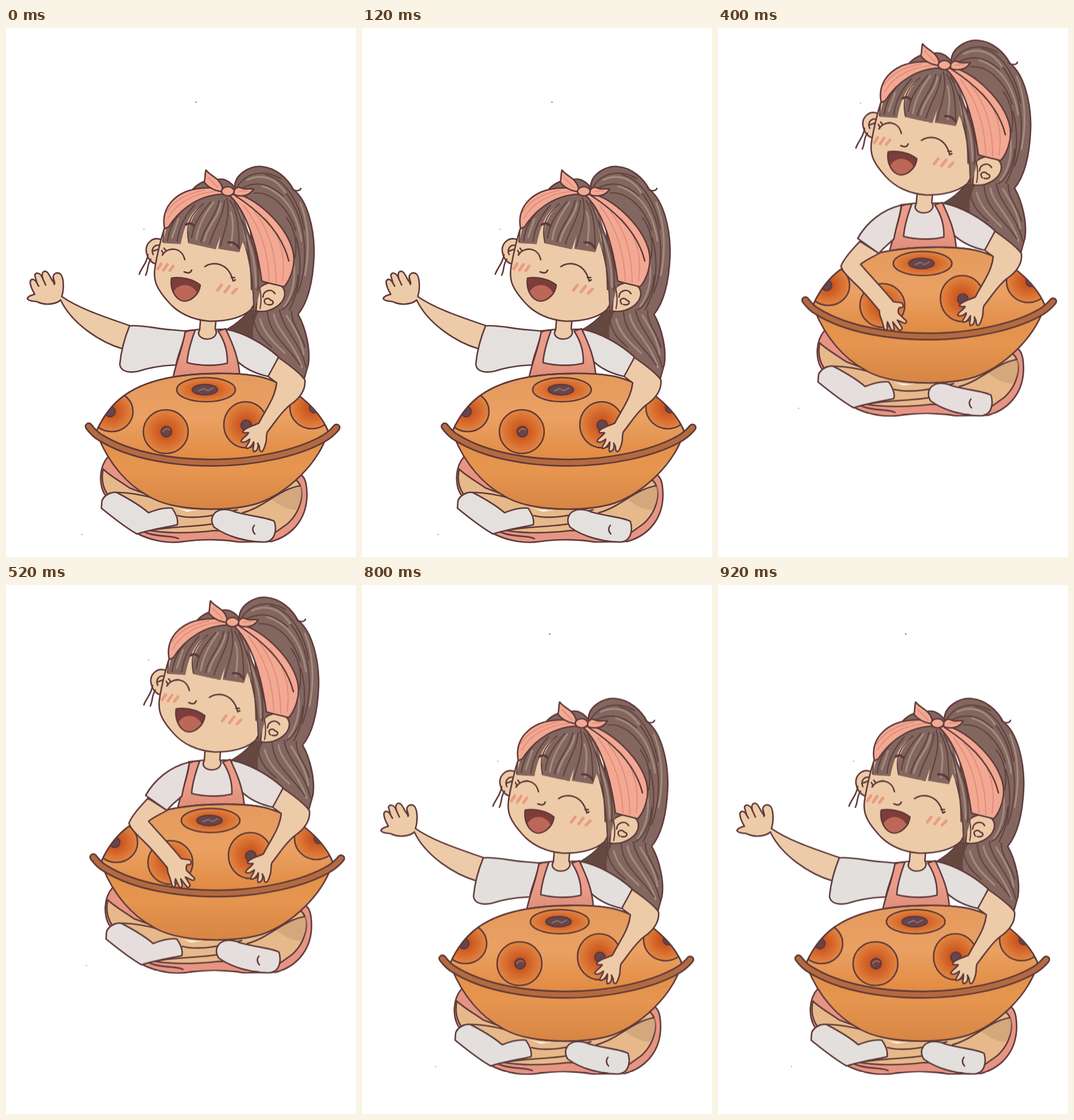
These frames come from a looping animation (609x920 px, 1 s). An HTML page without scripts:

```html
<!DOCTYPE html>
<html lang="en">
<head>
<meta charset="utf-8">
<title>Handpan girl</title>
<style>
  html, body { margin: 0; width: 100%; height: 100%; overflow: hidden; background: #fff; }
  svg { display: block; width: 100vw; height: 100vh; }

  #girl, .cloth, .arm { animation: 1s step-end infinite; }
  #girl { animation-name: hop; }
  .cloth { animation-name: shade; }
  #up { animation-name: up; }
  #down { animation-name: down; }
  #side { animation-name: side; }

  @keyframes hop {
    0% { transform: translate(0, 0); }
    20% { transform: translate(8px, -138.5px); }
    40% { transform: translate(8px, -219.5px); }
    60% { transform: translate(2.5px, -161.5px); }
    80% { transform: translate(-4px, -43.5px); }
  }
  @keyframes shade {
    0% { fill: #e4e0de; }
    20% { fill: #dcd7d8; }
    40% { fill: #e6dedd; }
    60% { fill: #efecea; }
    80% { fill: #e2dfdd; }
  }
  @keyframes up { 0%, 80% { visibility: visible; } 20% { visibility: hidden; } }
  @keyframes down { 0%, 60% { visibility: hidden; } 20% { visibility: visible; } }
  @keyframes side { 0%, 80% { visibility: hidden; } 60% { visibility: visible; } }

  path, ellipse { stroke: #5f3a3b; stroke-width: 2.6; stroke-linecap: round; stroke-linejoin: round; }
  .line { fill: none; }
  .bare { stroke: none; }
  .skin { fill: #edcba8; }
  .tan { fill: #e7b98a; }
  .pink { fill: #e69583; }
  .band { fill: #f2a892; }
  .hair { fill: #83665f; }
  .lit { fill: none; stroke: #a28c7e; stroke-width: 3.2; }
  .strand { fill: none; stroke: #60423f; stroke-width: 2.2; }
  .fold { fill: none; stroke: #de8874; stroke-width: 1.6; }
  .blush { fill: none; stroke: #eb9a82; stroke-width: 5; }
  .note { fill: url(#note); }
  .core { fill: #66464b; }
</style>
</head>
<body>
<svg viewBox="0 0 609 920" preserveAspectRatio="none">
  <defs>
    <linearGradient id="dome" x2="0" y2="1">
      <stop offset="0" stop-color="#e59a5d"/>
      <stop offset=".5" stop-color="#eaa163"/>
      <stop offset="1" stop-color="#e1893f"/>
    </linearGradient>
    <linearGradient id="bowl" x2="0" y2="1">
      <stop offset="0" stop-color="#e29047"/>
      <stop offset=".45" stop-color="#e69650"/>
      <stop offset="1" stop-color="#d78544"/>
    </linearGradient>
    <radialGradient id="note">
      <stop offset=".2" stop-color="#c9541f"/>
      <stop offset=".65" stop-color="#d96f30"/>
      <stop offset="1" stop-color="#e18743"/>
    </radialGradient>
    <linearGradient id="bib" x2="0" y2="1">
      <stop offset=".5" stop-color="#ea9c88"/>
      <stop offset="1" stop-color="#dd8c78"/>
    </linearGradient>
    <clipPath id="top">
      <path d="M158 700C180 652 215 620 290 607C330 600 400 598 440 606C500 620 545 665 560 700L557 712Q360 800 162 711Z"/>
    </clipPath>
  </defs>

  <g id="girl">
    <!-- stray specks -->
    <path class="line" stroke-width="1" d="M330 129l1 0M240 350h.1M132 881h.1" style="stroke-width:1.5"/>

    <!-- ponytail -->
    <path class="hair" d="M398 278C397 255 424 239 445 241C470 243 490 262 500 281C525 300 537 350 536 395C534 446 523 480 508 498C522 522 530 560 526 585L519 610C500 590 470 575 450 560L385 524C412 508 430 490 436 460L420 300Z"/>
    <path class="line" d="M497 278C502 285 511 284 513 279"/>
    <path class="bare" fill="#65483f" d="M385 524Q415 508 424 490L440 492Q425 520 432 545Z"/>
    <path class="lit" d="M420 264C447 252 470 262 486 286M446 275C482 286 506 318 514 370M512 304C525 335 530 380 520 430M500 405C506 440 496 468 484 484M466 498C470 525 500 545 515 590M488 500C500 520 514 540 518 568M442 506C450 535 470 550 485 565"/>
    <path class="strand" d="M403 275C420 250 452 246 478 262M410 279C436 264 460 272 482 292M432 287C460 284 490 310 504 352M452 255C490 264 512 310 519 350M488 288C520 330 530 400 508 460M505 365C518 410 510 460 493 490M508 430C506 465 490 485 480 490M455 494C458 535 490 552 512 586M476 490C482 525 512 545 522 590M497 492C496 515 514 530 520 555M430 500C432 530 450 545 462 555M488 330C500 345 508 370 503 400"/>

    <!-- legs -->
    <path class="pink" d="M178 745C160 765 163 795 171 810L228 879C255 893 285 897 310 893C345 888 385 890 405 894L462 893C500 882 528 850 523 800C522 788 519 780 512 776L440 790Z"/>
    <path class="tan" d="M169 767C180 778 195 786 215 800L275 822C300 840 390 842 440 826L505 786C523 802 514 840 490 862L469 877L362 874C330 878 290 880 250 874L298 862L220 840L176 810C168 798 166 782 169 767Z"/>
    <path class="bare" fill="#c99d73" opacity=".6" d="M462 820Q490 800 514 794Q518 820 505 838Q485 838 462 820Z"/>
    <path class="line" d="M180 809C200 805 250 812 277 826M250 874C290 866 330 868 362 862M299 848C330 856 370 846 402 838M412 843C450 833 475 802 512 796M240 876C260 886 290 882 300 888"/>
    <path class="bare" fill="#fff" d="M286 832Q310 841 338 838L315 841Z"/>
    <path class="cloth" d="M167 822C171 812 184 806 193 808C214 819 232 829 248 843C265 836 280 834 289 835C296 845 300 856 298 864C280 868 252 872 228 880C205 867 182 848 166 835Z"/>
    <path class="cloth" d="M362 845C370 835 386 836 400 842C430 850 455 851 467 858C472 875 467 893 450 894C420 894 385 885 362 868C357 860 357 852 362 845Z"/>
    <path class="line" d="M432 865Q426 872 433 880"/>

    <!-- torso -->
    <path class="cloth" d="M310 527L337 524Q352 530 368 524L385 524L403 580L400 605H296Z"/>
    <path class="skin" d="M339 500L337 525C331 534 340 541 350 541C361 541 370 533 364 523L366 500Z"/>
    <path class="cloth" d="M383 524C415 530 450 550 474 572C470 582 465 594 456 606C438 602 418 594 403 580Z"/>
    <path fill="url(#bib)" d="M311 529Q320 525 329 526C322 545 316 566 315 582C338 588 366 588 385 583C386 562 379 542 369 527L382 523C394 548 406 575 407 610L290 612C294 585 308 557 311 529Z"/>

    <!-- drum -->
    <path fill="url(#bowl)" d="M160 710C180 760 213 795 246 813C290 842 392 842 440 826C490 808 540 760 558 710Q360 800 160 710Z"/>
    <path fill="url(#dome)" d="M158 700C180 652 215 620 290 607C330 600 400 598 440 606C500 620 545 665 560 700L557 712Q360 800 162 711Z"/>
    <g clip-path="url(#top)">
      <ellipse class="note" cx="184" cy="667" rx="37" ry="35"/>
      <ellipse class="core" cx="181" cy="667" rx="9" ry="9"/>
      <ellipse class="note" cx="532" cy="660" rx="38" ry="37"/>
      <ellipse class="core" cx="536" cy="660" rx="8" ry="9"/>
    </g>
    <path class="line" d="M158 700C180 652 215 620 290 607C330 600 400 598 440 606C500 620 545 665 560 700"/>
    <ellipse class="note" cx="348" cy="629" rx="51" ry="21"/>
    <ellipse class="core" cx="346" cy="629" rx="22" ry="9"/>
    <path class="line" style="stroke:#90757a;stroke-width:2" d="M335 631L344 627L351 631L360 626"/>
    <ellipse class="note" cx="278" cy="702" rx="39" ry="38"/>
    <ellipse class="core" cx="279" cy="702" rx="9" ry="9"/>
    <path class="line" style="stroke:#b9683f;stroke-width:2" d="M273 702Q278 694 285 699"/>
    <ellipse class="note" cx="417" cy="690" rx="38" ry="40"/>
    <ellipse class="core" cx="418" cy="691" rx="9" ry="9"/>
    <g class="line">
      <path id="rim" style="stroke-width:14" d="M144 693C150 701 155 707 164 712C220 747 300 756 360 756C430 756 510 740 556 712C564 707 570 701 575 695"/>
      <path style="stroke:#b46a40;stroke-width:8.5" d="M144 693C150 701 155 707 164 712C220 747 300 756 360 756C430 756 510 740 556 712C564 707 570 701 575 695"/>
    </g>

    <!-- right arm -->
    <path class="skin" d="M474 573C490 584 511 599 520 612C522 630 510 645 495 655C478 668 466 689 455 702C452 708 454 716 452 722C450 728 449 733 446 736C442 738 441 734 441 728L438 722C440 730 437 736 431 737C428 734 432 727 431 720C428 727 423 732 418 731C416 727 424 722 424 715C419 719 413 722 409 719C409 714 418 711 422 704C418 703 413 706 412 702C416 694 431 692 440 687C450 666 468 645 471 617L456 606Z"/>

    <!-- left arm poses -->
    <g id="up" class="arm">
      <path class="skin" d="M216 518C180 505 130 490 97 467C101 455 101 435 95 428C88 423 82 428 82 434L85 444C78 440 76 425 69 423C62 423 62 430 64 436C60 425 52 424 50 430L54 444C50 436 44 435 42 441C42 450 47 458 50 463C44 465 38 466 37 471C42 477 52 474 56 477C70 483 88 480 95 473C115 515 165 547 203 558Z"/>
      <path class="line" d="M64 436L69 447M82 434L84 446M54 444L57 449"/>
      <path class="cloth" d="M215 518C240 516 265 524 290 525L312 527C309 550 298 570 296 586C270 587 245 592 230 597C212 601 199 596 198 585C200 563 206 540 215 518Z"/>
    </g>
    <g id="down" class="arm">
      <g transform="translate(-8 138.5)">
        <path class="skin" d="M247 452C235 465 220 480 214 495C216 505 230 517 245 532C258 545 270 560 281 573C280 580 284 586 286 593L289 604C292 609 296 605 294 598L295 592L301 605C304 610 308 606 306 600L304 592L314 605C318 609 322 605 319 600L312 589L323 594C328 596 330 591 325 588L314 577C313 572 314 567 317 567C322 569 324 564 320 559L305 557C288 535 265 512 248 492C256 485 268 480 280 473Z"/>
        <path class="cloth" d="M319 389C285 397 258 420 243 447L280 473C288 463 298 456 306 448C310 425 317 408 319 389Z"/>
      </g>
    </g>
    <g id="side" class="arm">
      <g transform="translate(-2.5 161.5)">
        <path class="skin" d="M214 378C180 383 142 396 107 424C102 428 98 424 90 420C80 412 65 407 53 413C50 420 60 422 70 426C60 431 45 428 36 432C34 439 42 440 55 441C45 442 36 443 36 449C42 453 50 451 57 450C50 453 43 456 45 461C52 463 62 461 73 458C72 464 66 470 68 475C75 478 87 468 93 459C100 448 108 446 120 443C150 431 180 422 211 407Z"/>
        <path class="line" d="M55 441L70 442M57 450L70 449M70 426C80 432 90 428 96 427"/>
        <path class="cloth" d="M215 377C230 366 250 362 270 362L315 365C312 390 303 408 302 425C270 432 240 435 215 435C208 420 209 395 215 377Z"/>
      </g>
    </g>

    <!-- head -->
    <path class="hair" d="M322 284C335 268 350 264 362 265C377 259 390 266 400 280L425 300L360 310Z"/>
    <path class="skin" d="M272 369C256 361 243 374 244 388C246 402 254 411 266 411Z"/>
    <path class="line" d="M267 378C257 376 252 386 256 394M256 388L267 384M247 394C245 410 236 416 232 428M252 402C245 412 248 420 243 430"/>
    <path class="skin" d="M275 350C268 372 264 390 260 412C254 440 264 456 284 478C300 496 325 508 355 510C385 510 410 504 426 490C440 470 445 430 436 395L400 300L340 295Z"/>
    <path class="skin" d="M438 456C450 437 483 440 485 460C486 480 460 497 435 492Z"/>
    <path class="line" d="M447 468C448 456 462 452 468 462M452 480C444 470 458 468 460 473C468 475 466 483 455 481"/>
    <path class="bare hair" d="M280 344L273 374L304 376L318 340L316 374L365 385L373 362L369 384L406 390L412 372C424 400 428 440 431 492Q440 470 446 440L405 295L380 286Q310 290 280 344Z"/>
    <path class="bare skin" d="M343 306C325 317 312 335 304 376L317 374C314 345 325 325 343 306Z"/>
    <path class="lit" d="M300 332L289 364M361 303C345 325 335 343 331 368M374 305C370 330 350 345 345 370M391 320C398 340 393 360 392 378M418 360C430 390 434 415 435 450M405 318C412 335 414 350 417 370"/>
    <path class="strand" d="M275 350L273 372M312 312C294 330 285 345 281 370M328 308C308 330 300 350 298 371M343 306C320 325 312 345 318 372M357 302C338 323 326 341 323 365M371 300C365 328 345 345 339 372M380 300C378 330 361 350 354 376M384 296C392 325 379 355 373 380M390 300C408 330 404 360 406 385M397 304C416 340 426 390 427 455M408 330C432 370 443 420 438 456M418 385C428 420 431 460 431 492M441 450Q446 470 442 488"/>
    <path class="line" style="stroke-width:4" d="M313 342Q321 337 327 344M387 373Q398 371 405 382"/>

    <!-- headband -->
    <path class="band" d="M276 349C270 320 285 297 312 285C335 276 358 277 379 280L380 289C340 289 304 312 283 346Z"/>
    <path class="band" d="M389 291C414 315 434 360 445 440C456 444 470 446 484 450C496 436 505 410 499 387C489 348 445 302 402 288Z"/>
    <path class="fold" d="M282 331C295 305 325 288 365 284M280 320C292 300 315 288 345 282M414 309C444 348 456 390 458 440M432 319C461 355 470 400 470 443M450 330C479 360 487 400 481 440"/>
    <path class="line" d="M398 291C440 318 480 355 492 405"/>
    <path class="band" d="M379 285C365 284 352 278 345 268C347 260 346 253 348 247C356 258 371 260 376 276Z"/>
    <path class="band" d="M394 287C400 276 405 275 411 279C418 281 425 279 431 280C425 290 415 294 400 291Z"/>
    <ellipse class="band" cx="386" cy="284" rx="11" ry="8"/>
    <path class="fold" d="M352 260L369 278M405 284L420 283"/>

    <!-- face -->
    <path class="line" d="M272 395C281 380 306 380 311 403M346 415C358 406 386 406 395 439M392 434L398 434M395 440L399 438M274 393L271 387M279 388L275 383M310 424Q320 429 323 421"/>
    <path fill="#7e3d39" d="M288 435C302 432 325 436 338 447C336 464 322 475 310 475C295 473 285 455 288 435Z"/>
    <path class="bare" fill="#bd6759" d="M292 458C302 443 322 443 332 460C325 470 317 474 309 474C301 472 296 467 292 458Z"/>
    <path class="blush" d="M264 419L270 410M274 421L281 411M285 422L291 414M368 456L375 447M381 459L389 449M394 461L401 454"/>
  </g>
</svg>
</body>
</html>
```
